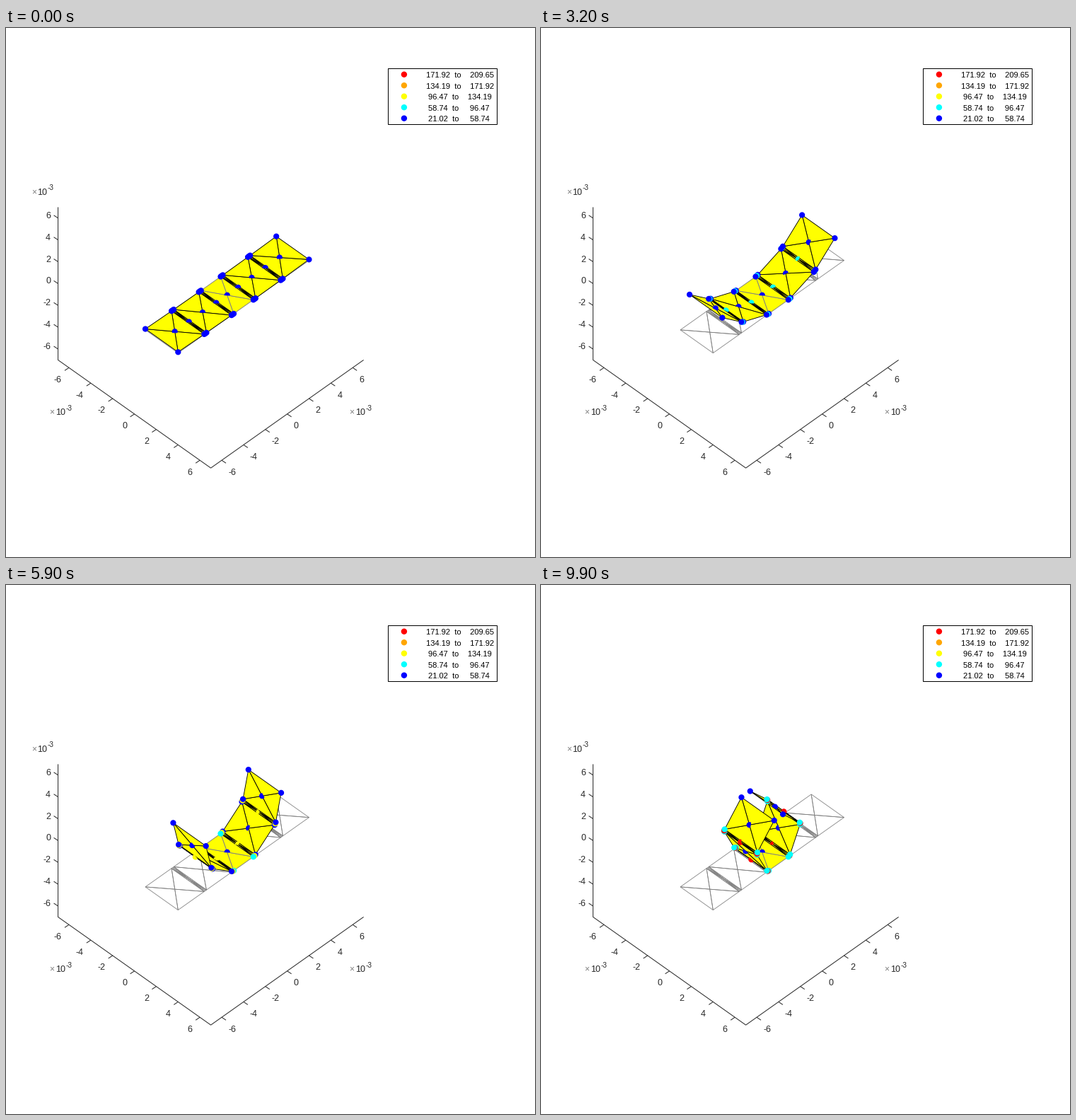
Recreate the animation shown at these times as a matplotlib script. Size 748x748 px, loop 10 s.

```python
import numpy as np
import matplotlib.pyplot as plt
from matplotlib.animation import FuncAnimation
from matplotlib.collections import LineCollection, PolyCollection
from matplotlib.patches import Circle, Rectangle

SIZE, DPI, STEPS = 748, 64, 100
PT = 72 / DPI                      # points per pixel
INK = (0.15, 0.15, 0.15)
GRAY = (0.5, 0.5, 0.5)
YELLOW = (1, 1, 0)
HEAT = np.array([(0, 0, 1), (0, 1, 1), (1, 1, 0), (1, 0.65, 0), (1, 0, 0)])
T_MIN, T_MAX = 21.016, 209.646
LEVELS = np.linspace(T_MIN, T_MAX, 6)

ORIGIN = np.array([289.6, 361.4])
UNIT = 15.43
SLANT = UNIT * np.sqrt(0.5)
RIGHT = np.array([0.5, 0.5, 0]) ** 0.5
UP = np.array([-0.5, 0.5, 0.5 ** 0.5])
VIEW = np.array([0.5, -0.5, 0.5 ** 0.5])

WIDTH, GAP, SPAN = 3.0, 0.2, 2.5   # panel width, crease width, hinge spacing
R = 4.1                            # marker radius

# heating per step
MID, END, BASE, ARM, COLD = 1.8863, 1.6, 0.745, 0.58, 0.0

fig = plt.figure(figsize=(SIZE / DPI, SIZE / DPI), dpi=DPI, facecolor="white")
ax = fig.add_axes([0, 0, 1, 1])
ax.set(xlim=(0, SIZE), ylim=(SIZE, 0))
ax.axis("off")


def project(p):
    a, b, z = np.moveaxis(np.asarray(p, float), -1, 0)
    xy = np.stack([(a + b) * UNIT, (a - b) * SLANT - z * UNIT], axis=-1)
    return ORIGIN + xy


def label(x, y, s, size=12.5, ha="left", color=INK):
    ax.text(x, y + 0.36 * size, s, fontsize=size * PT, ha=ha, va="baseline",
            color=color, family="Liberation Sans", zorder=1)


def line(points):
    x, y = np.transpose(points)
    ax.plot(x, y, color=INK, lw=PT, solid_capstyle="butt", zorder=1)


def power(x, y):
    label(x, y, "×", 12, color=GRAY)
    label(x + 8.5, y, "10")
    label(x + 23, y - 5.5, "-3", 10)


def draw_axes():
    line(project([(-7, -7, 7), (-7, -7, -7), (7, -7, -7), (7, 7, -7)]))
    for v in range(-6, 7, 2):
        ticks = [((-7, -7, v), (-6, -4), (-10.5, -4.5), "right"),
                 ((v, -7, -7), (-6, 4), (-10.5, 16), "right"),
                 ((7, v, -7), (6, 4), (9, 16), "left")]
        for p, tick, shift, ha in ticks:
            q = project(p)
            line([q, q + tick])
            x, y = q + shift
            label(x, y, str(v), ha=ha)
    power(36, 231)
    power(61.5, 542.5)
    power(485.5, 542.5)


def draw_legend():
    ax.add_patch(Rectangle((540.5, 56.5), 154, 79, fc="white", ec="black", lw=PT))
    for i in range(5):
        lo, hi = LEVELS[4 - i], LEVELS[5 - i]
        y = 65.7 + 15.5 * i
        ax.add_patch(Circle((562.9, y), 4.2, fc=HEAT[4 - i], ec="none"))
        label(594 if lo >= 100 else 597, y + 0.7, f"{lo:.2f}  to  {hi:8.2f}",
              11.1, color="black")


def profile(step, side):
    """Side view of one arm: nodes (b, z) and the direction of each piece."""
    t1, t2 = np.radians([0.667 * step, 0.633 * step])
    angle = np.array([t1 / 4, t1 * 0.75, t1, t1 + t2 / 4, t1 + t2 * 0.75, t1 + t2])
    length = np.array([GAP / 2, GAP / 2, SPAN - GAP, GAP / 2, GAP / 2, SPAN - GAP / 2])
    b = 1 - GAP / 2 + np.cumsum(np.r_[0, length * np.cos(angle)])
    z = np.cumsum(np.r_[0, length * np.sin(angle)])
    return np.stack([side * b, z], axis=-1), angle


def at(a, node):
    return np.array([a, node[0], node[1]])


def panel(p, q):
    c = at(WIDTH / 2, (p + q) / 2)
    k = [at(0, p), at(WIDTH, p), at(WIDTH, q), at(0, q)]
    return [(k[i], k[(i + 1) % 4], c) for i in range(4)]


def crease(p, m, q):
    mid = at(WIDTH / 2, m)
    tris = []
    for e in (p, q):
        tris += [(at(0, e), at(0, m), mid), (at(0, e), at(WIDTH, e), mid),
                 (at(WIDTH, e), at(WIDTH, m), mid)]
    return tris


def arm(n):
    """Triangles of the near and the far half of an arm."""
    near = crease(*n[0:3]) + panel(n[2], n[3])
    far = crease(*n[3:6]) + panel(n[5], n[6])
    return near, far


TURN = np.linspace(0, 2 * np.pi, 72, endpoint=False)
DISC = R * np.stack([np.cos(TURN), np.sin(TURN)], axis=-1)


def on_screen(v):
    return np.array([v @ RIGHT, -(v @ UP)])


def sunk(angle, side, depth, way=0):
    """Scale of each marker ray where a tilted surface hides its tip.

    way is 1 or -1 if the surface lies only outwards or inwards of the node.
    """
    normal = np.array([0, -side * np.sin(angle), np.cos(angle)])
    g = -on_screen(normal) * np.sign(normal @ VIEW)
    rise = DISC @ (g / np.hypot(*g))
    if way:
        ax_a = on_screen(np.array([1, 0, 0]))
        out = way * on_screen(np.array([0, side * np.cos(angle), np.sin(angle)]))
        perp = np.array([-ax_a[1], ax_a[0]])
        rise = np.where((DISC @ perp) * (out @ perp) > 0, rise, 0)
    return np.minimum(1, depth / np.maximum(rise, 1e-6))


def edge_marks(node, rate):
    return [(at(a, node), rate, 1) for a in (0, WIDTH)]


def hinge_marks(n, before, after, side, inner):
    scale = np.minimum(sunk(before, side, 0.8, -1), sunk(after, side, 0.8, 1))
    return (edge_marks(n[0], inner) + edge_marks(n[1], END)
            + edge_marks(n[2], ARM) + [(at(WIDTH / 2, n[1]), MID, scale)])


def arm_marks(n, angle, side):
    def centre(i, depth):
        return (at(WIDTH / 2, (n[i] + n[i + 1]) / 2), COLD,
                sunk(angle[i], side, depth))
    near = hinge_marks(n[0:3], 0, angle[2], side, BASE) + [centre(2, 0.5)]
    far = hinge_marks(n[3:6], angle[2], angle[5], side, ARM)
    far += edge_marks(n[6], COLD) + [centre(5, 2)]
    return near, far


def set_marks(coll, marks, step):
    marks = sorted(marks, key=lambda m: m[0] @ VIEW)
    temps = [T_MIN + m[1] * step for m in marks]
    coll.set_verts([project(p) + DISC * np.reshape(scale, (-1, 1))
                    for p, _, scale in marks])
    coll.set_facecolor(HEAT[np.searchsorted(LEVELS[1:5] + 0.02, temps)])


def mesh(z, edge="black", tris=()):
    coll = PolyCollection([project(t) for t in tris], facecolors=[YELLOW],
                          edgecolors=[edge], linewidths=0.9 * PT, zorder=z)
    return ax.add_collection(coll, autolim=False)


def dots(z):
    coll = PolyCollection([], edgecolors="none", zorder=z)
    return ax.add_collection(coll, autolim=False)


draw_axes()
draw_legend()

# flat reference shape and the fixed middle panel
flat = []
for sgn in (-1, 1):
    for part in arm(profile(0, sgn)[0]):
        flat += part
segments = [project([t[i], t[(i + 1) % 3]]) for t in flat for i in range(3)]
ax.add_collection(LineCollection(segments, colors=[GRAY], linewidths=0.8 * PT,
                                 zorder=2), autolim=False)
HALF = 1 - GAP / 2
mesh(3, GRAY, panel(np.array([-HALF, 0]), np.array([HALF, 0])))

right_mesh, right_dots = mesh(4), dots(5)
near_mesh, near_dots = mesh(6), dots(7)
far_mesh, far_dots = mesh(8), dots(9)
HUB = (np.array([WIDTH / 2, 0, 0]), COLD, sunk(0, 1, 0.5))


def update(i):
    step = i + 1
    n, angle = profile(step, 1)
    near, far = arm(n)
    right_mesh.set_verts([project(t) for t in near + far])
    near, far = arm_marks(n, angle, 1)
    set_marks(right_dots, near + far + [HUB], step)

    n, angle = profile(step, -1)
    for coll, tris in zip((near_mesh, far_mesh), arm(n)):
        coll.set_verts([project(t) for t in tris])
    for coll, marks in zip((near_dots, far_dots), arm_marks(n, angle, -1)):
        set_marks(coll, marks, step)
    return right_mesh, right_dots, near_mesh, near_dots, far_mesh, far_dots


anim = FuncAnimation(fig, update, frames=STEPS, interval=100, repeat=True,
                     repeat_delay=0, blit=False)
plt.show()
```
